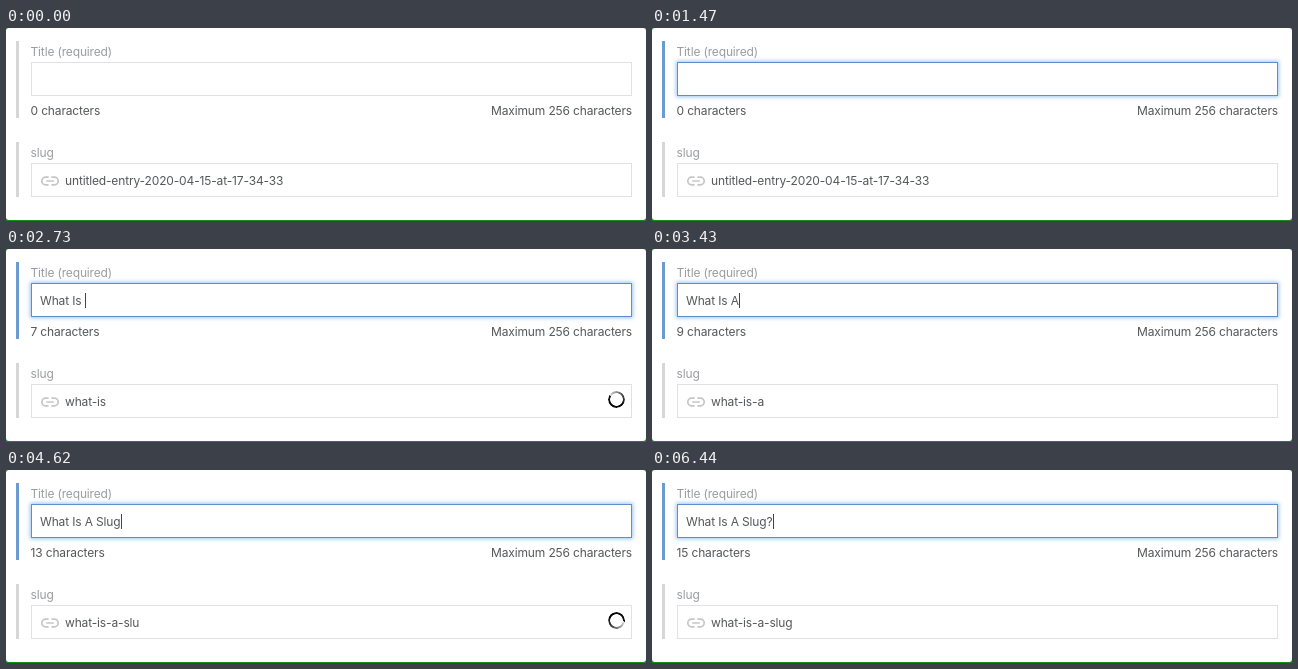
An HTML page for the animation above (6790 ms loop, 640 by 193 pixels).

```html
<!DOCTYPE html>
<html lang="en">
<head>
<meta charset="utf-8">
<title>Slug field</title>
<style>
  html, body { margin: 0; width: 100%; height: 100%; overflow: hidden; background: #168a1c; }
  .panel { position: absolute; left: 0; top: 0; width: 640px; height: 191.5px; border-radius: 3px; background: #fff; }
  .panel > * { position: absolute; box-sizing: border-box; }
  .bar { left: 10px; width: 3px; background: #d6d6d6; }
  .box { left: 25px; width: 601px; height: 34px; border: 1px solid #e0e1e2; }
  .title.bar { top: 13px; height: 77px; }
  .title.box { top: 34px; }
  .slug.bar { top: 114px; height: 55px; }
  .slug.box { top: 135px; }
  .bar.focus { background: #6c9bd2; }
  .box.focus { border-color: #5d8fca; box-shadow: 0 0 4px 1px rgba(91, 158, 232, .6); }
  .spinner {
    left: 602px; top: 142px; width: 17px; height: 17px; border-radius: 50%;
    background: conic-gradient(from -60deg, #ddd, #555 30%, #000 55%, #111);
    -webkit-mask: radial-gradient(circle, transparent 6px, #000 6.6px);
    mask: radial-gradient(circle, transparent 6px, #000 6.6px);
  }
  svg { left: 0; top: 0; width: 640px; height: 191px; }
  text { font: 12px Inter, Roboto, sans-serif; letter-spacing: -.15px; fill: #555759; white-space: pre; }
  .label { fill: #9a9c9f; }
  .icon { fill: none; stroke: #c6c6c6; stroke-width: 1.7; }
</style>
</head>
<body>
<div class="panel">
  <div class="title bar"></div>
  <div class="title bar focus" id="focusBar"></div>
  <div class="title box"></div>
  <div class="title box focus" id="focusBox"></div>
  <div class="slug bar"></div>
  <div class="slug box"></div>
  <div class="spinner" id="spinner"></div>
  <svg viewBox="0 0 640 191">
    <text class="label" x="24.5" y="28">Title (required)</text>
    <text id="title" x="34" y="56"></text>
    <rect id="caret" y="44" width="1" height="15" fill="#444"/>
    <text id="count" x="24.5" y="87"></text>
    <text x="626" y="87" text-anchor="end">Maximum 256 characters</text>
    <text class="label" x="24.5" y="129">slug</text>
    <path class="icon" d="M42.6 149.2H39.6a3.8 3.8 0 0 0 0 7.6H42.6M45.4 149.2H48.4a3.8 3.8 0 0 1 0 7.6H45.4M40.2 153H47.8"/>
    <text id="slug" x="59" y="157"></text>
  </svg>
</div>
<script>
  const LOOP = 6790, FOCUS = 700, BLINK = 560;
  const TITLE = 'What Is A Slug?';
  const EMPTY_SLUG = 'untitled-entry-2020-04-15-at-17-34-33';
  // Time of each key press
  const keys = [1820, 1960, 2030, 2100, 2380, 2450, 2590, 2730, 2940, 3570, 3920, 4060, 4270, 4480, 5250];
  // [time, characters counted]; the count and slug lag behind the typing
  const updates = [[0, 0], [1960, 1], [2100, 4], [2450, 5], [2590, 6], [2730, 7], [2800, 8],
    [3150, 9], [4270, 12], [4480, 13], [4830, 14], [5600, 15]];
  // [start, end] of each save
  const saves = [[1960, 2100], [2380, 2590], [2730, 2800], [3080, 3430], [4270, 4900]];

  const $ = id => document.getElementById(id);
  const [title, caret, count, slug, spinner, focusBar, focusBox] =
    ['title', 'caret', 'count', 'slug', 'spinner', 'focusBar', 'focusBox'].map($);

  const slugify = s => s.toLowerCase().replace(/[^a-z]+/g, '-').replace(/-$/, '');

  function setText(el, value) {
    if (el.textContent !== value) el.textContent = value;
  }

  function draw(t) {
    const focus = t < FOCUS ? 0 : Math.min(1, .5 + (t - FOCUS) / 280);
    focusBar.style.opacity = focus;
    focusBox.style.opacity = Math.min(1, focus * 1.6);

    const typed = keys.filter(k => k <= t).length;
    setText(title, TITLE.slice(0, typed));

    const lastKey = typed ? keys[typed - 1] : FOCUS;
    const lit = t >= FOCUS && Math.floor((t - lastKey) / BLINK) % 2 === 0;
    caret.style.opacity = lit ? 1 : 0;
    caret.setAttribute('x', Math.round(34 + (typed ? title.getComputedTextLength() : 0)));

    const counted = updates.filter(u => u[0] <= t).pop()[1];
    setText(count, counted + ' characters');
    setText(slug, counted ? slugify(TITLE.slice(0, counted)) : EMPTY_SLUG);

    const save = saves.find(([a, b]) => t >= a && t < b);
    spinner.style.opacity = save ? 1 : 0;
    if (save) spinner.style.transform = `rotate(${(t - save[0]) * .45}deg)`;
  }

  const start = performance.now();
  function tick() {
    draw((performance.now() - start) % LOOP);
    requestAnimationFrame(tick);
  }
  tick();
</script>
</body>
</html>
```
